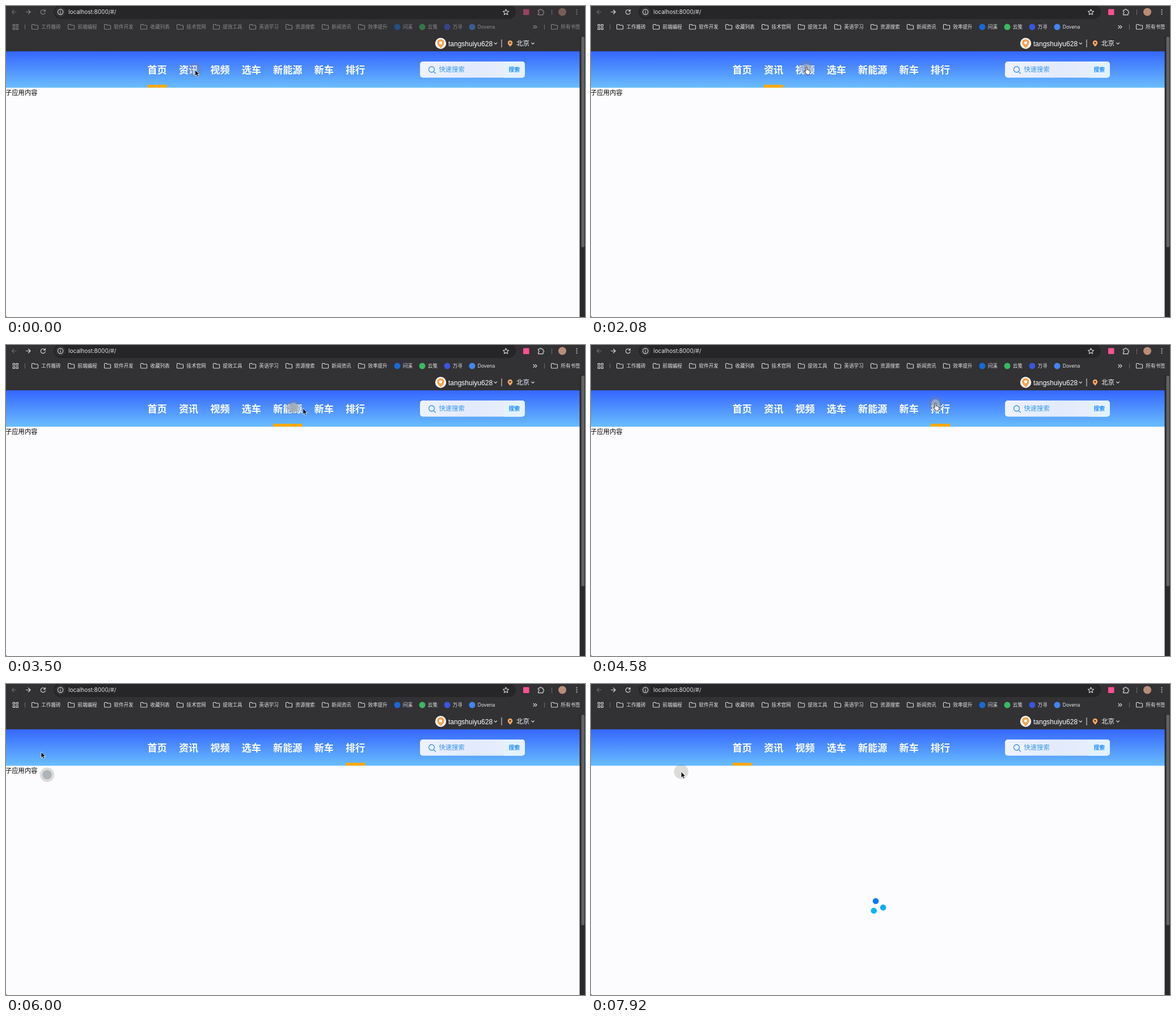
An HTML page for the animation above (8 s loop, 1021x549 px).

```html
<!DOCTYPE html>
<html lang="zh-CN">
<head>
<meta charset="utf-8">
<title>导航演示</title>
<style>
html, body { margin: 0; width: 100%; height: 100%; overflow: hidden; background: #fcfcfe; }
svg { display: block; width: 100%; height: 100%; }
text { font-family: "Noto Sans CJK SC", "Noto Sans CJK", sans-serif; fill: #fff; white-space: pre; }
.ui { font-family: Inter, "Noto Sans CJK SC", "Noto Sans CJK", sans-serif; fill: #e4e4e6; }
.user { font-family: "Liberation Sans", sans-serif; }
.nav { font-weight: 700; }
.line { fill: none; stroke: #dcdcde; stroke-width: 1.1; stroke-linecap: round; stroke-linejoin: round; }
.faint { stroke: #6c6c70; }
</style>
</head>
<body>
<svg viewBox="0 0 1021 549" preserveAspectRatio="none">
  <defs>
    <linearGradient id="sky" x2="0" y2="1">
      <stop stop-color="#3566ff"/><stop offset="1" stop-color="#69bdff"/>
    </linearGradient>
    <linearGradient id="field">
      <stop stop-color="#eff2fe"/><stop offset=".5" stop-color="#e2eafc"/><stop offset="1" stop-color="#eaf0fb"/>
    </linearGradient>
  </defs>

  <!-- browser bars and page header -->
  <rect width="1021" height="549" fill="#fcfcfe"/>
  <rect width="1021" height="80" fill="#323134"/>
  <rect x="84" y="-2" width="815" height="25" rx="12.5" fill="#262528"/>
  <circle cx="96" cy="10.5" r="9" fill="#323134"/>
  <g class="line">
    <circle cx="96" cy="10.5" r="4.6"/>
    <path d="M96 10.3v2.3M96 8.3v.1"/>
    <path class="faint" d="M18 10.5h-7.500l3.500-3.500m-3.500 3.500l3.500 3.500"/>
    <path d="M881.5 5.8l1.5 3.2 3.5.4-2.6 2.4.7 3.5-3.1-1.8-3.1 1.8.7-3.5-2.6-2.4 3.5-.4z"/>
    <path class="faint" d="M33.5 33v8M949.500 33v8M962.5 6.500v9"/>
  </g>
  <g id="chrome">
    <g class="line">
      <path d="M35.5 10.5h7.500l-3.500-3.500m3.500 3.500l-3.500 3.500"/>
      <path d="M68.7 8.600a4 4 0 1 0 .5 3M69.2 6.300v2.800h-2.800"/>
      <path d="M938.5 7.200h2.700a1.600 1.600 0 0 1 3.200 0h2.600v2.600a1.600 1.600 0 0 1 0 3.200v2.600h-8.500v-2.600a1.600 1.600 0 0 0 0-3.200z"/>
      <path d="M930 34.500l2.500 2.500-2.500 2.500M933.500 34.500l2.500 2.500-2.500 2.500"/>
      <path id="more" stroke-width="2" d="M1006.5 6.700v.01m0 3.800v.01m0 3.800v.01"/>
    </g>
    <rect x="912" y="5.500" width="10.500" height="10.500" rx="1" fill="#ff4f92"/>
    <circle cx="981" cy="10.500" r="7" fill="#b98d78"/>
    <g id="marks"></g>
  </g>
  <rect y="80" width="1012" height="64.300" fill="url(#sky)"/>
  <circle cx="766.5" cy="66" r="9.700" fill="#fff"/>
  <path d="M766.5 74.500q-6.400-5.500-6.400-9.700a6.400 6.400 0 0 1 12.800 0q0 4.200-6.400 9.700z" fill="#f9a252"/>
  <circle cx="766.5" cy="65" r="2.600" fill="#fff"/>
  <path d="M889 71.800q-4.300-4-4.300-6.800a4.300 4.300 0 0 1 8.600 0q0 2.800-4.300 6.800z" fill="#ffa75e"/>
  <circle cx="889" cy="65" r="1.500" fill="#323134"/>
  <path class="line" d="M861 65l2.300 2.300 2.300-2.300M926.800 65l2.300 2.300 2.300-2.300M874 59.500v13"/>
  <rect x="730" y="98" width="185" height="28.500" rx="5" fill="url(#field)"/>
  <path d="M878 98h32a5 5 0 0 1 5 5v18.500a5 5 0 0 1-5 5h-32z" fill="#e4f2ff"/>
  <path d="M754.5 116.500l3 2.500" stroke="#3293ec" stroke-width="1.300" stroke-linecap="round"/>
  <circle cx="750.5" cy="112" r="5" fill="none" stroke="#3293ec" stroke-width="1.300"/>
  <g id="labels"></g>
  <rect id="bar" y="139" height="5" fill="#ffa902"/>

  <!-- scrollbar -->
  <rect x="1011.500" y="53" width="10" height="496" fill="#2a2a2c"/>
  <rect x="1014.500" y="54" width="5.500" height="372" rx="2.700" fill="#636364"/>
  <path d="M0 547v2h2q-2 0-2-2z" fill="#000"/>

  <g id="loader">
    <circle cx="10" r="5.300" fill="#087cfb"/>
    <circle cx="10" r="5.300" fill="#0aaafb" transform="rotate(120)"/>
    <circle cx="10" r="5.300" fill="#0bb4fc" transform="rotate(240)"/>
  </g>

  <!-- pointer -->
  <g id="halo">
    <circle r="12.700" fill="#807f78" fill-opacity=".26"/>
    <circle id="dot" fill="#a6aeb5"/>
  </g>
  <g id="pointer">
    <path id="arrow" d="M0 0v10.500l2.400-2.200 1.700 3.900 1.900-.8-1.700-3.800h3.300z" fill="#000" stroke="#fff" stroke-width=".8" stroke-linejoin="round"/>
    <path id="hand" d="M-1.200 7.300V.8a1.100 1.100 0 0 1 2.200 0v4q1.700-.8 2 .5 1.500-.6 1.800.6 1.500-.3 1.500 1.200v2q0 1.500-1 2.600v1.500h-5.300v-1.300q-1.700-1.500-3.300-4.300-.5-1.500 1-1.200z" fill="#fff" stroke="#111" stroke-width=".8" stroke-linejoin="round"/>
  </g>
</svg>
<script>
const $ = id => document.getElementById(id);
const LOOP = 8000, STEP = 1000 / 12, FOCUS = 500, RELOAD = 7080;

const label = (x, mid, size, str, cls = '', fill = '') =>
  `<text x="${x}" y="${mid + size * 0.37}" font-size="${size}" class="${cls}" ${fill && `style="fill:${fill}"`}>${str}</text>`;
const mark = (x, str) => label(x, 37, 8.6, str, 'ui');
const folder = (x, str) =>
  `<path class="line" d="M${x + 0.5} 33.5q0-1 1-1h2.7l1.5 1.5h4.8q1 0 1 1v5q0 1-1 1h-9q-1 0-1-1z"/>` + mark(x + 17.3, str);
const site = (x, color, str) => `<circle cx="${x}" cy="37" r="5.5" fill="${color}"/>` + mark(x + 9.7, str);
const cell = (_, i) =>
  `<rect class="line" x="${12.3 + 5.7 * (i % 2)}" y="${32.5 + 5.7 * (i >> 1)}" width="3.3" height="3.3"/>`;

const folders = ['工作搬砖', '前端编程', '软件开发', '收藏列表', '技术官网',
  '提效工具', '英语学习', '资源搜索', '新闻资讯', '效率提升'];
$('marks').innerHTML = [
  ...Array.from({ length: 4 }, cell),
  ...folders.map((str, i) => folder(45 + 64 * i, str)),
  site(690, '#1769d8', '问溪'), site(734, '#3bb862', '云笺'),
  site(778, '#3a55e0', '万寻'), site(822, '#4285f4', 'Dovena'),
  folder(961, '所有书签')
].join('');

const SIZE = 17.1, GAP = 21.2;
let left = 249.5;
const tabs = ['首页', '资讯', '视频', '选车', '新能源', '新车', '排行'].map(name => {
  const tab = { name, x: left, w: name.length * SIZE };
  left += tab.w + GAP;
  return tab;
});
const tabAt = (x, y) => y > 81 && y < 144 && tabs.find(tab => x >= tab.x && x <= tab.x + tab.w);

$('labels').innerHTML =
  label(110, 10.7, 10, 'localhost:8000/#/', 'ui') +
  label(780, 66.3, 12, 'tangshuiyu628', 'user') +
  label(900, 66, 11.5, '北京') +
  tabs.map(tab => label(tab.x, 113, SIZE, tab.name, 'nav')).join('') +
  label(763.5, 112.3, 11.3, '快速搜索', '', '#3496ee') +
  label(886.5, 112.3, 9.8, '搜索', 'nav', '#1c8cff') +
  `<g id="content">${label(-1, 152.5, 11.3, '子应用内容', '', '#000')}</g>`;

// each stop: when the pointer leaves for it, travel time, place, click time, upward arc
const stops = [
  { at: 0, dur: 1, x: 333.5, y: 113 },
  { at: 80, dur: 80, x: 329, y: 113, click: 1250 },
  { at: 1500, dur: 80, x: 339, y: 114 },
  { at: 1670, dur: 250, x: 380, y: 108, click: 2040 },
  { at: 2200, dur: 300, x: 443, y: 106, click: 2710 },
  { at: 2880, dur: 290, x: 506, y: 110, click: 3330 },
  { at: 3400, dur: 230, x: 550, y: 115, click: 3920 },
  { at: 4170, dur: 250, x: 607.5, y: 103, click: 4490 },
  { at: 4700, dur: 1130, x: 74, y: 166, click: 5750, arc: 35 },
  { at: 5880, dur: 240, x: 50, y: 74 },
  { at: 6130, dur: 450, x: 65.5, y: 10.5, click: 6840 },
  { at: 7270, dur: 560, x: 159, y: 155 }
];
const clicks = stops.filter(s => s.click);

const clamp = v => Math.max(0, Math.min(1, v));
const ease = k => k * k * (3 - 2 * k);
const move = (el, x, y, extra = '') => el.setAttribute('transform', `translate(${x} ${y}) ${extra}`);
const show = (el, on) => el.style.display = on ? '' : 'none';

function posAt(t) {
  const i = Math.max(0, stops.findLastIndex(s => s.at <= t));
  const to = stops[i], from = stops[i - 1] || to;
  const k = ease(clamp((t - to.at) / to.dur));
  return [
    from.x + (to.x - from.x) * k,
    from.y + (to.y - from.y) * k - (to.arc || 0) * 4 * k * (1 - k)
  ];
}

function activeTab(t) {
  if (t >= RELOAD) return tabs[0];
  const hits = clicks.filter(s => s.click + 80 <= t && tabAt(s.x, s.y));
  const last = hits.pop();
  return last ? tabAt(last.x, last.y) : tabs[0];
}

function drawDot(t) {
  const last = clicks.filter(s => s.click <= t).pop();
  const age = last ? t - last.click : Infinity;
  show($('dot'), age < 430);
  if (age >= 430) return;
  $('dot').setAttribute('r', 5.5 + 2.8 * clamp(age / 150));
  $('dot').setAttribute('opacity', Math.min(0.5 + age / 350, 0.88) * clamp((430 - age) / 130));
}

function draw(t) {
  const [x, y] = posAt(t);
  move($('pointer'), x, y);
  move($('halo'), ...posAt(t - STEP));
  drawDot(t);

  const hover = t > FOCUS && Boolean(tabAt(x, y));
  show($('hand'), hover);
  show($('arrow'), !hover);
  $('chrome').setAttribute('opacity', 0.5 + 0.5 * clamp((t - FOCUS) / 300));

  const tab = activeTab(t);
  $('bar').setAttribute('x', tab.x);
  $('bar').setAttribute('width', tab.w);

  show($('content'), t < RELOAD);
  show($('loader'), t > RELOAD + 80);
  move($('loader'), 505.3, 392.7, `rotate(${(t - RELOAD) * 0.3})`);
}

// the screen refreshes 12 times a second
function tick() {
  const t = performance.now() % LOOP;
  draw(Math.floor((t + 4) / STEP) * STEP);
  requestAnimationFrame(tick);
}
tick();
</script>
</body>
</html>
```
